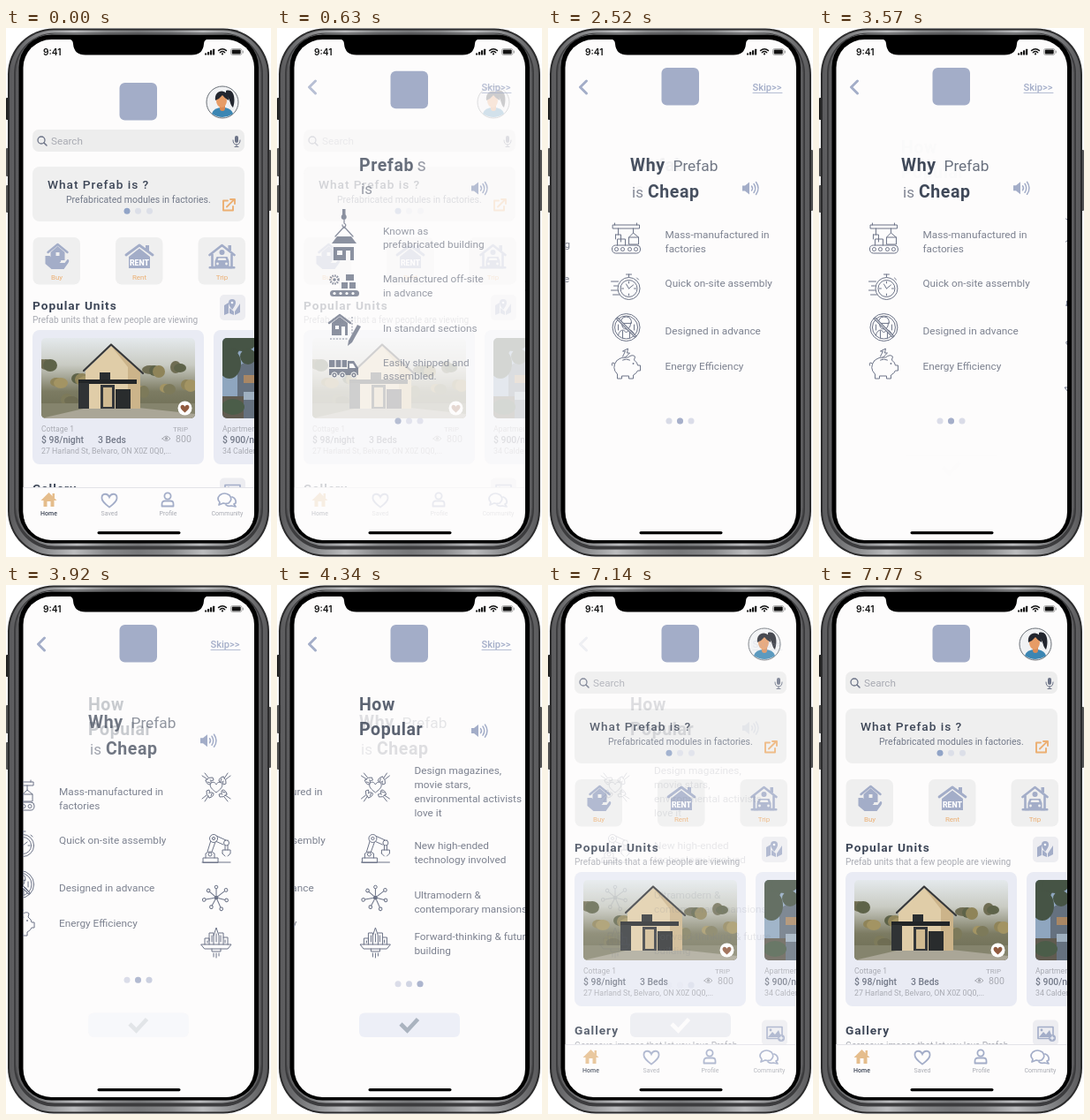
An HTML page for the animation above (7910 ms loop, 300 by 599 pixels).

```html
<!DOCTYPE html>
<html lang="en">
<head>
<meta charset="utf-8">
<title>Prefab app</title>
<style>
html, body { margin: 0; width: 100%; height: 100%; overflow: hidden; background: #fff; }
svg { display: block; width: 100vw; height: 100vh; }
text { font-family: Roboto, sans-serif; white-space: pre; }
.heading { letter-spacing: .07em; }
.title { letter-spacing: .03em; }
</style>
</head>
<body>
<svg id="stage" viewBox="0 0 300 599"></svg>
<script>
const BLUE = '#a3adc8', INK = '#3d4657', LABEL = '#7d8290', SLATE = '#6c7387',
      PALE = '#efefef', GREY = '#a9abb3', ORANGE = '#ecaf72';

// Drawing helpers: each returns SVG markup.
const text = (x, y, size, str, fill = LABEL, weight = 400, anchor = 'start', style = '') =>
  `<text class="${style}" x="${x}" y="${y}" font-size="${size}" fill="${fill}" font-weight="${weight}" text-anchor="${anchor}">${str}</text>`;
const heading = (x, y, str, weight = 700) => text(x, y, 13.7, str, INK, weight, 'start', 'heading');
const title = (x, y, str) => text(x, y, 19.5, str, INK, 700, 'start', 'title');
const rect = (x, y, w, h, r, fill) => `<rect x="${x}" y="${y}" width="${w}" height="${h}" rx="${r}" fill="${fill}"/>`;
const disc = (x, y, r, fill, stroke = 'none') => `<circle cx="${x}" cy="${y}" r="${r}" fill="${fill}" stroke="${stroke}"/>`;
const oval = (x, y, rx, ry, fill) => `<ellipse cx="${x}" cy="${y}" rx="${rx}" ry="${ry}" fill="${fill}"/>`;
const shape = (d, fill) => `<path d="${d}" fill="${fill}"/>`;
const line = (d, stroke = SLATE, width = 1, cap = 'round', join = 'round') =>
  `<path d="${d}" fill="none" stroke="${stroke}" stroke-width="${width}" stroke-linecap="${cap}" stroke-linejoin="${join}"/>`;
const at = (x, y, ...parts) => `<g transform="translate(${x} ${y})">${parts.join('')}</g>`;
const turn = (angle, part) => `<g transform="rotate(${angle})">${part}</g>`;
const group = (id, ...parts) => `<g id="${id}">${parts.join('')}</g>`;
const clip = (id, ...parts) => `<g clip-path="url(#${id})">${parts.join('')}</g>`;
const heart = (s, fill, stroke = 'none', w = 1) =>
  `<path transform="scale(${s})" d="M0 8C-5 4-9 1-9-3C-9-9-2-9 0-4C2-9 9-9 9-3C9 1 5 4 0 8Z" fill="${fill}" stroke="${stroke}" stroke-width="${w / s}"/>`;

// ---- Device ----
const device = [
  rect(0, 79, 4, 25, 1, '#222'), rect(0, 136, 4, 32, 1, '#555'), rect(0, 178, 4, 31, 1, '#555'),
  rect(296, 138, 4, 69, 1, '#555'),
  rect(2, 0.5, 296, 598, 52, '#2b2b2c'),
  rect(4, 2.5, 292, 594, 50, 'url(#metal)'),
  rect(9, 5.5, 282, 585, 46, '#3c3c3e'), rect(11, 6.5, 278, 580, 44, 'url(#metal)'),
  rect(14.5, 7.5, 271.5, 576, 37, '#000'),
  rect(19.5, 13, 261.5, 567, 32, '#fdfcfc')].join('');

const status = [
  shape('M70 12Q76 13 76 18Q77 30.5 90 30.5H210Q223 30.5 224 18Q224 13 230 12Z', '#000'),
  `<text x="42" y="30.5" font-size="10.2" font-weight="600" fill="#111" style="font-family:Inter,sans-serif">9:41</text>`,
  [0, 1, 2, 3].map(i => rect(225 + i * 3, 28.5 - i * 1.6, 2.2, 2 + i * 1.6, 0.5, '#111')).join(''),
  line('M240.5 25.6Q245 21.8 249.5 25.6M242.3 27.7Q245 25.4 247.7 27.7', '#111', 1.4), disc(245, 29.4, 1.1, '#111'),
  `<rect x="254.5" y="23.5" width="12.5" height="7" rx="2" fill="none" stroke="#999" stroke-width=".8"/>`,
  rect(255.7, 24.6, 10, 4.8, 1, '#111'), rect(267.8, 25.5, 1, 3, 0.5, '#999'),
  rect(103.5, 570, 94, 3.2, 1.6, '#000')].join('');

// ---- Home ----
const avatar = at(245, 84,
  disc(0, 0, 18, '#f1f2f4', '#6a7077'),
  shape('M4-13C14-16 15-2 12 6C8 3 9-5 4-8Z', '#23262f'),
  shape('M-12 13Q-10 6 0 6Q10 6 12 13Q0 21-12 13Z', '#3b86b3'),
  rect(-3, 1, 6, 9, 3, '#d98a55'), oval(-1, -2, 6, 8, '#e79c66'),
  shape('M-8-2C-10-16 8-16 7-2Q2-5 0-8Q-3-4-8-2Z', '#23262f'));

const buyIcon = [
  line('M-10-5L1-14L12-5', BLUE, 2.4), shape('M-7-5L1-12L9-5V4H-7Z', BLUE), rect(-1, -5, 4, 4, 0, PALE),
  shape('M-13-1H-8L-4 3H4Q6 5 3 7H9L12 3Q15 3 13 7L8 14H-6L-13 8Z', BLUE)];
const rentIcon = [
  line('M-15-2L0-13L15-2', BLUE, 2.8), rect(7, -13, 4, 7, 0, BLUE),
  shape('M-12 0L0-9.5L12 0V13H-12Z', BLUE), text(0, 9.5, 8.8, 'RENT', '#fff', 900, 'middle')];
const tripIcon = [
  line('M-14-2L0-13L14-2M-11-3V12H-7M11-3V12H7', BLUE, 2.6), rect(7, -13, 3.5, 6, 0, BLUE),
  disc(0, -5, 3, BLUE), shape('M-8 5L-6 0H6L8 5V12H-8Z', BLUE),
  shape('M-5 4L-4 1.5H4L5 4Z', PALE), disc(-5, 8, 1.4, PALE), disc(5, 8, 1.4, PALE),
  rect(-15, 11, 30, 2.5, 1, BLUE)];
const tile = (x, icon, label) =>
  rect(x, 237, 53.5, 53.5, 7, PALE) + at(x + 27, 259, ...icon) + text(x + 27, 284.5, 8, label, ORANGE, 400, 'middle');

const foliage = ['#7d7a5a', '#5e6349', '#a39463', '#6f6d53', '#8f8459'];
const cottagePhoto = clip('photo',
  rect(40, 351, 174, 91, 0, 'url(#woods)'),
  Array.from({ length: 30 }, (_, i) => oval(40 + i * 41 % 176, 380 + i * 17 % 44, 6 + i % 4, 5 + i % 3, foliage[i % 5])).join(''),
  rect(40, 425, 174, 17, 0, '#85846d'), shape('M40 442L92 430H150L214 437V442Z', '#aaa697'),
  shape('M90 431V388L119 360L152 389V431Z', '#e0cda8'), shape('M119 360L152 389V431H138V384Z', '#ccb48a'),
  line('M88 388L119 358.5L155 391', '#37383a', 2.2),
  rect(106, 390, 12, 8, 0, '#292d30'), rect(82, 398, 66, 5, 0, '#222527'),
  rect(82, 402, 12, 29, 0, '#303335'), rect(107, 404, 16, 27, 0, '#34373a'),
  rect(110, 407, 10, 22, 0, '#d0ba91'), rect(124, 409, 17, 22, 0, '#292c2d'));
const flatPhoto = clip('photo2',
  rect(245, 351, 60, 91, 0, '#8fa6bf'), shape('M262 442V384L290 365V442Z', '#65717f'),
  rect(269, 393, 12, 9, 0, '#a98764'), rect(269, 412, 12, 9, 0, '#9fb0c0'),
  [[250, 360, 15, 14], [268, 356, 15, 10], [253, 380, 13, 17], [274, 372, 9, 9]].map(o => oval(...o, '#465445')).join(''),
  rect(245, 417, 24, 25, 0, '#605b50'), oval(257, 429, 13, 9, '#4b5d49'));

const card = (x, photo, name, price, address) =>
  rect(x, 342, 194, 152, 8, '#e9ebf4') + photo + text(x + 10, 457, 8.6, name, GREY) +
  text(x + 10, 470, 10.4, price, '#737988', 500) + text(x + 10, 482, 8.8, address, GREY);

const section = (y, name, note) =>
  heading(30, y, name) + text(30, y + 15.5, 10.1, note, GREY) + rect(242, y - 16.5, 29, 29, 5, '#ededf1');

const homeScroll = [
  avatar,
  rect(30, 115, 240, 25, 7, '#ededed'),
  `<circle cx="40" cy="127" r="4" fill="none" stroke="${SLATE}" stroke-width="1.3"/>`, line('M43 130L46 133', SLATE, 1.5),
  text(51, 132, 11.7, 'Search', GREY),
  rect(259, 122, 4, 8, 2, SLATE), line('M257 127Q257 132 261 132Q265 132 265 127M261 132V134.5M259 134.5H263'),
  rect(30, 157, 240, 62, 8, PALE),
  heading(47, 182, 'What Prefab is ?', 500), text(68, 198, 10.5, 'Prefabricated modules in factories.', '#727989'),
  disc(137, 207.3, 3.5, '#91a4c7'), disc(149.5, 207.3, 3.5, '#dcdfe8'), disc(162.5, 207.3, 3.5, '#dcdfe8'),
  line('M251 195.5H246V206.5H257V202M250 202.5L258 194.5M254 194H259V199', ORANGE, 1.9),
  tile(30.5, buyIcon, 'Buy'), tile(124, rentIcon, 'Rent'), tile(217.5, tripIcon, 'Trip'),
  section(318.5, 'Popular Units', 'Prefab units that a few people are viewing'),
  shape('M247 314L252 311V323L247 325ZM253 317L258 321V325L253 323ZM259 321L265 312V322L259 325Z', BLUE),
  shape('M256 319Q252 314 252 311A4 4 0 0 1 260 311Q260 314 256 319Z', BLUE), disc(256, 311, 1.3, '#fff'),
  card(30, cottagePhoto, 'Cottage 1', '$ 98/night', '27 Harland St, Belvaro, ON X0Z 0Q0,...'),
  text(104, 470, 10.4, '3 Beds', '#737988', 500), text(189, 457, 8, 'TRIP', GREY), text(192, 469, 10.6, '800', GREY),
  line('M177 465Q181.5 459 186 465Q181.5 470 177 465Z', GREY), disc(181.5, 464.8, 1.7, GREY),
  disc(202.5, 430.5, 8, '#fff'), at(202.5, 431, heart(0.55, '#915b40')),
  card(235, flatPhoto, 'Apartment 1', '$ 900/night', '34 Calder St'),
  section(526, 'Gallery', 'Gorgeous images that let you love Prefab'),
  line('M248 517.5H265V530.5H248Z', BLUE, 1.6), shape('M249 529L254 523L257 526L261 521L264 529Z', BLUE),
  disc(252, 521, 1.4, BLUE), disc(264, 530, 4, BLUE), line('M262 530H266M264 528V532', '#fff')].join('');

const tabBar = [
  rect(19, 520, 263, 48, 0, '#fdfcfc'), line('M20 520.5H281', '#e3e3e8'),
  at(48.5, 534, shape('M-9 1L0-8L9 1H6V8H2V2H-2V8H-6V1Z', '#e5bd8c'), rect(4, -7, 2.5, 5, 0, '#e5bd8c')),
  at(117, 535, heart(0.95, 'none', BLUE, 1.8)),
  at(183, 534, `<circle cy="-4" r="3.6" fill="none" stroke="${BLUE}" stroke-width="1.8"/>`, line('M-6.5 7.5V5Q-6.5 1.5-3 1.5H3Q6.5 1.5 6.5 5V7.5Z', BLUE, 1.8)),
  at(250, 534, line('M-8 3Q-12-1-8-5Q-3-9 3-5Q7 0 2 4Q-2 5-4 4L-9 6ZM6-3Q11-1 10 4L8 5L10 8L5 7Q1 8-1 6', BLUE, 1.7)),
  text(48.5, 551.5, 7, 'Home', INK, 500, 'middle'), text(117, 551.5, 7, 'Saved', GREY, 400, 'middle'),
  text(183.5, 551.5, 7, 'Profile', GREY, 400, 'middle'), text(250.5, 551.5, 7, 'Community', GREY, 400, 'middle')].join('');

// ---- Onboarding ----
const crane = [
  rect(-2, -29, 3.5, 7, 0, SLATE), disc(-0.3, -20, 3, SLATE), line('M0-17V-13Q3-11 1-9Q-2-8-2-11M0-9L-10 2M0-9L10 2', SLATE, 1.3),
  shape('M-14 10L-8 2H8L14 10Z', SLATE), shape('M-12 14H11V29H-12ZM-8 18V23H-2V18ZM2 18V29H7V18Z', SLATE)];
const conveyor = [
  rect(-16, 6, 33, 7, 3.5, SLATE), [-11, -4, 3, 10].map(x => disc(x, 9.5, 1.6, '#fff')).join(''),
  rect(-3, -3, 7, 7, 0, SLATE), rect(6, -3, 7, 7, 0, SLATE), rect(2, -12, 9, 7, 0, SLATE),
  `<circle cx="-11" cy="-6" r="4.5" fill="none" stroke="${SLATE}" stroke-width="2.4" stroke-dasharray="1.5 1.1"/>`, disc(-11, -6, 1.8, SLATE)];
const blueprint = [
  line('M-17-7L-5-16L7-7', SLATE, 2.2), shape('M-14-7L-5-14L4-7V7H-14Z', SLATE),
  rect(-10, -4, 4, 4, 0, '#fff'), rect(-3, -3, 4, 10, 0, '#fff'),
  `<path d="M-16 11H5M9-14V8" stroke="${SLATE}" stroke-dasharray="2 1.5" fill="none"/>`,
  shape('M4 19L5 13L15-5L19-3L9 15Z', SLATE)];
const truck = [
  rect(-17, -9, 20, 8, 0, SLATE), line('M-10-9V-1M-3-9V-1M-17 1H4', '#fff', 1.2),
  shape('M-17 1H4V-8H11L16 0V8H-17Z', SLATE), shape('M6-5H10L13 0H6Z', '#fff'),
  [-11, -2, 11].map(x => disc(x, 8, 3.2, SLATE, '#fff') + disc(x, 8, 1.1, '#fff')).join('')];
const factory = [
  line('M-15-16H15V-12H-15ZM-9-12V-5M-12-5H-6V0M-12-5V0M8-12V-7M3-2L8-7L14-2H3V6H14V-2M-16 11Q-16 7-12 7H12Q16 7 16 11Q16 16 12 16H-12Q-16 16-16 11M-10 7V0H-1V7M-6 0V3M-13-16V-18M12-16V-18'),
  [-11, -4, 4, 11].map(x => disc(x, 11.5, 2, 'none', SLATE)).join('')];
const stopwatch = [
  disc(3, 2, 12.5, 'none', SLATE), disc(3, 2, 9.5, 'none', SLATE),
  line('M0-14H6M3-14V-11M12-10L14-8M3 2L8-2M3 2L0-3M-17-6H-9M-14-1H-10M-17 4H-10M-15 9H-8M3-6V-4M3 8V10M-5 2H-3M9 2H11')];
const noWorker = [
  disc(0, 0, 15.5, 'none', SLATE), disc(0, 0, 13, 'none', SLATE),
  line('M-6-5Q-6-12 0-12Q6-12 6-5ZM-5-5Q-5 2 0 2Q5 2 5-5M-9 9Q-8 3-3 3L0 6L3 3Q8 3 9 9M-4 4V12M4 4V12M-9-3V3M9-3V3'),
  line('M-10-10L10 10', SLATE, 3), line('M-10-10L10 10', '#fff')];
const piggy = [
  line('M-11-4Q-6-9 2-8Q7-12 10-9L9-5Q13-2 13 1H16V7H13Q12 10 8 12V16H3V13H-5V16H-10V11Q-17 4-11-4M-13-1Q-17-4-16 1M-4-5Q0-7 4-5'),
  disc(8, -1, 0.9, SLATE), line('M-4-9L-1-15H-4L2-18L1-13H4L-2-7')];
const hands = [0, 90, 180, 270].map(a => turn(a,
  line('M-16-13L-10-9M-13-16L-9-11M-12-8Q-8-12-4-11L-3-8Q-5-7-7-8M-12-8Q-11-3-7-3Q-5-5-6-7M-10-6L-7-5'))).concat(heart(0.75, '#fdfcfc', SLATE));
const robot = [
  line('M-15 16V11H2V16ZM-12 11V6Q-7 2-2 6V11M-10 4L-6-9M-5 4L-1-7M0-14L11-9M-1-8L8-4M10-9V2M13-9V2M7 6V2H16V6L13 9M7 6L10 9M-16 16H16'),
  disc(-3, -11, 4.5, '#fdfcfc', SLATE), disc(-3, -11, 1.6, 'none', SLATE), disc(11.5, -6, 3, '#fdfcfc', SLATE), disc(-7, 7, 2, 'none', SLATE)];
const network = [0, 52, 104, 156, 208, 260, 312].map((a, i) =>
  turn(a, line(`M0-3V${i % 2 ? -12 : -10}`) + disc(0, i % 2 ? -14 : -12, 1.8, 'none', SLATE))).concat(disc(0, 0, 2.5, SLATE));
const city = [
  line('M-17 3H17L13 8H-13ZM-13 3V-4H-8V3M-8-1V-10H-3V3M-3-7L0-16L3-7V3M3-10H8V3M8-5H13V3M-5 8V11H5V8M-3 13V17M0 13V18M3 13V16M-5-7V0M5-7V0M0-9V0M-10-1V1M10-2V1')];

const list = (id, icons, lines) => group(id,
  icons.map(([y, icon]) => at(76, y, ...icon)).join(''),
  lines.map(([y, str]) => text(120, y, 11.8, str)).join(''));
const button = (id, fill, tick) => group(id, rect(93, 484.5, 114, 27.5, 6, fill),
  line('M140 497L147.5 504.5L159.5 491.5', tick, 4.6, 'butt', 'miter'));

const pages = [
  line('M43.5 60L36.5 67L43.5 74', BLUE, 2.9),
  text(231.5, 71, 11.1, 'Skip&gt;&gt;', BLUE, 500), line('M232 73.5H265', BLUE, 0.8),
  group('title1', title(93, 161.5, 'Prefab'), text(158.5, 161.5, 20, 's'), text(95, 188, 17, 'is')),
  group('title2', title(93, 161.5, 'Why'), text(141.5, 161.5, 17.3, 'Prefab', '#686f7d'),
    text(95, 192, 17, 'is'), title(113, 192, 'Cheap')),
  group('title3', title(93, 141.5, 'How'), title(93, 170, 'Popular')),
  group('speaker', shape('M220-3H223L228-7V7L223 3H220Z', BLUE), line('M230.5-2.5Q232.5 0 230.5 2.5M233-5Q236.5 0 233 5M235.5-7Q240.5 0 235.5 7', BLUE, 1.5)),
  list('list1', [[234, crane], [291, conveyor], [341, blueprint], [385, truck]],
    [[234, 'Known as'], [249, 'prefabricated building'], [288, 'Manufactured off-site'], [304, 'in advance'],
     [344, 'In standard sections'], [382.5, 'Easily shipped and'], [398, 'assembled.']]),
  list('list2', [[239, factory], [293, stopwatch], [339, noWorker], [381, piggy]],
    [[238, 'Mass-manufactured in'], [254, 'factories'], [292.5, 'Quick on-site assembly'],
     [347, 'Designed in advance'], [387, 'Energy Efficiency']]),
  list('list3', [[229, hands], [298, robot], [354, network], [404, city]],
    [[214, 'Design magazines,'], [230, 'movie stars,'], [246, 'environmental activists'], [262, 'love it'],
     [299, 'New high-ended'], [315, 'technology involved'], [355, 'Ultramodern &amp;'], [371, 'contemporary mansions'],
     [401.5, 'Forward-thinking &amp; future'], [417.5, 'building']]),
  group('dots', [137, 149.5, 162].map((x, i) => disc(x, 0, 3.5, '#dbdde9') + group('dot' + (i + 1), disc(x, 0, 3.5, BLUE))).join('')),
  button('button', '#eaecf6', '#9aa5b3'),
  button('pressed', BLUE, '#fff')].join('');

const clipRect = (id, x, y, w, h, r) => `<clipPath id="${id}">${rect(x, y, w, h, r, '#000')}</clipPath>`;
const gradient = (id, x2, y2, ...colors) => `<linearGradient id="${id}" x2="${x2}" y2="${y2}">` +
  colors.map((c, i) => `<stop offset="${i / (colors.length - 1)}" stop-color="${c}"/>`).join('') + '</linearGradient>';
const stage = document.getElementById('stage');
stage.innerHTML = '<defs>' +
  gradient('metal', 1, 0, '#5a5a5c', '#88898b', '#bcbdbf', '#88898b', '#77787a', '#88898b', '#bcbdbf', '#88898b', '#5a5a5c') +
  gradient('woods', 0, 1, '#e4e9ec', '#c9cbc3', '#7c7b62', '#6a6a51') +
  clipRect('screen', 19.5, 13, 261.5, 567, 32) + clipRect('photo', 40, 351, 174, 91, 5) + clipRect('photo2', 245, 351, 60, 91, 5) + '</defs>' +
  device + clip('screen', group('home', group('scroll', homeScroll), tabBar), group('pages', pages),
    group('logo', rect(128.5, 0, 42.5, 42.5, 6, BLUE))) + status;

// ---- Motion ----
const LOOP = 7910, SLIDE = 222;
const node = {};
stage.querySelectorAll('g[id]').forEach(g => node[g.id] = g);
const fade = (id, a) => node[id].setAttribute('opacity', a);
const move = (id, x, y) => node[id].setAttribute('transform', `translate(${x} ${y})`);
const mix = (a, b, p) => a + (b - a) * p;
const ease = (t, start, length) => {
  const u = Math.min(1, Math.max(0, (t - start) / length));
  return u < 0.5 ? 2 * u * u : 1 - 2 * (1 - u) ** 2;
};

function draw(t) {
  const open = ease(t, 90, 810), second = ease(t, 2130, 470), third = ease(t, 3480, 1200),
        press = ease(t, 4850, 400), close = ease(t, 6430, 1000);
  const shown = open * (1 - close);
  fade('home', 1 - shown);
  fade('pages', shown);
  move('scroll', 0, t < 4000 ? 0 : -17);
  move('logo', 0, mix(62, 45, open));
  [1 - second, second * (1 - third), third].forEach((a, i) => {
    fade('title' + (i + 1), a);
    fade('dot' + (i + 1), a);
    move('list' + (i + 1), SLIDE * (i - second - third), 0);
  });
  move('speaker', 0, mix(181.5, 162, third));
  move('dots', 0, mix(445, 453, third));
  fade('button', third);
  fade('pressed', press);
}

(function tick() {
  draw(performance.now() % LOOP);
  requestAnimationFrame(tick);
})();
</script>
</body>
</html>
```
